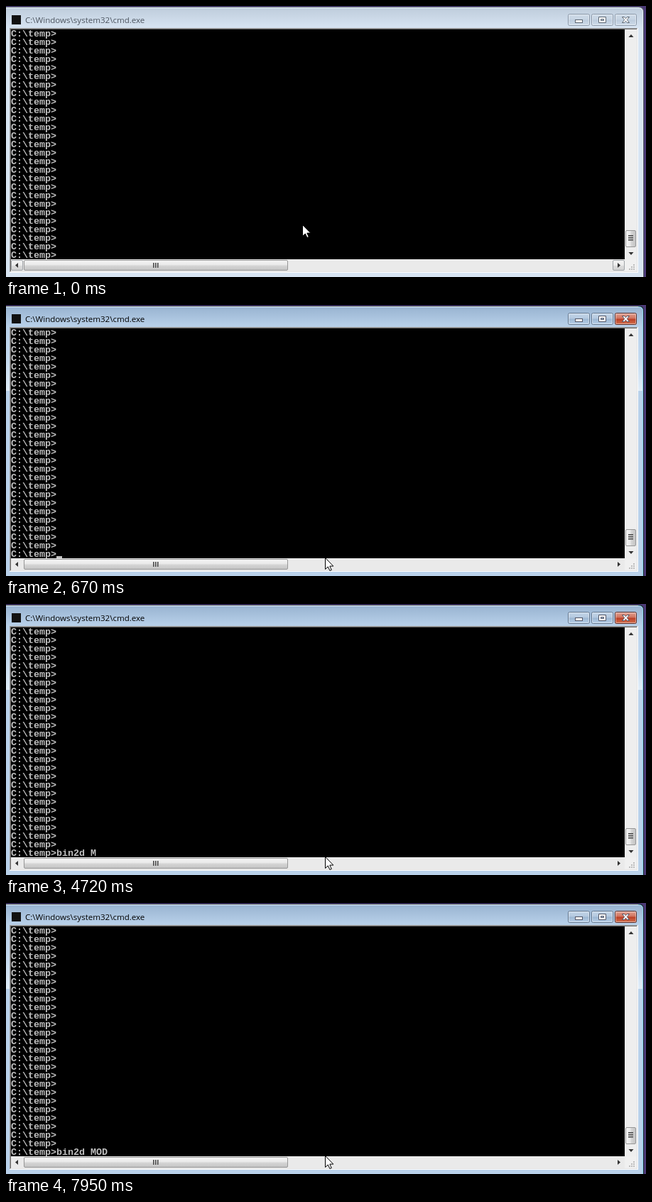
Animation, 901 px wide and 382 px high, one loop 8 s. Source, as an HTML page:

```html
<!DOCTYPE html>
<html lang="en">
<head>
<meta charset="utf-8">
<title>Console</title>
<style>
  html, body { margin: 0; width: 100%; height: 100%; overflow: hidden; background: #4b3a77; }
  svg { display: block; width: 100vw; height: 100vh; }
  .title { font: 11.55px "Open Sans", "Noto Sans", sans-serif; }
  .console { font: bold 13.33px "Liberation Mono", "Courier New", monospace; fill: #c0c0c0; white-space: pre; }
</style>
</head>
<body>
<svg id="stage" viewBox="0 0 901 382" preserveAspectRatio="none">
  <defs>
    <clipPath id="screen"><rect x="7" y="33" width="864" height="324"/></clipPath>
  </defs>
</svg>
<script>
const stage = document.getElementById('stage');
const defs = stage.querySelector('defs');
const LOOP = 8000, CELL = 8, ROW = 12, LEFT = 7, PROMPT = 'C:\\temp>';

function add(parent, tag, attrs, text) {
  const el = document.createElementNS('http://www.w3.org/2000/svg', tag);
  for (const key in attrs) el.setAttribute(key, attrs[key]);
  if (text !== undefined) el.textContent = text;
  parent.appendChild(el);
  return el;
}
const rect = (parent, x, y, width, height, fill, more) =>
  add(parent, 'rect', { x, y, width, height, fill, ...more });
const path = (parent, d, fill, more) => add(parent, 'path', { d, fill, ...more });

// stops: [offset, colour] pairs; runs downwards unless across is set
function gradient(id, stops, across) {
  const g = add(defs, 'linearGradient', { id, x1: 0, y1: 0, x2: across ? 1 : 0, y2: across ? 0 : 1 });
  for (const [offset, color] of stops) add(g, 'stop', { offset, 'stop-color': color });
  return `url(#${id})`;
}

const thumbStops = [[0, '#f6f6f6'], [.48, '#e8e8e8'], [.52, '#d6d6d6'], [1, '#c4c4c4']];
const thumbDown = gradient('thumbDown', thumbStops);
const thumbAcross = gradient('thumbAcross', thumbStops, true);
const arrowFace = gradient('arrowFace', [[0, '#f5f5f5'], [.5, '#ebebeb'], [.52, '#dcdcdc'], [1, '#d2d2d2']]);

const idleButton = [[0, '#cfdbe8'], [.48, '#c6d4e3'], [.52, '#bccbdc'], [1, '#cfdcea']];
const looks = {
  idle: {
    title: [[0, '#bfcddc'], [1, '#d7e4f2']],
    side: [[0, '#d7e4f2'], [1, '#d7e4f2']],
    frame: '#d7e4f2', edge: '#56606c', glow: '#e9f1f9', text: '#4d5560', glyphEdge: '#5c6672',
    button: idleButton, close: idleButton, rim: '#8997a8', closeRim: '#8997a8'
  },
  active: {
    title: [[0, '#99b4d1'], [1, '#b9d1ea']],
    side: [[0, '#b9d1ea'], [.5, '#c3d9ef'], [1, '#e1edf8']],
    frame: '#b9d1ea', edge: '#20262e', glow: '#8fdcf2', text: '#000', glyphEdge: '#535666',
    button: [[0, '#c5d6e8'], [.48, '#b3c8df'], [.52, '#9cb6d2'], [1, '#b8d0e8']],
    close: [[0, '#e3a596'], [.48, '#d0705b'], [.52, '#bb3e25'], [1, '#d3714f']],
    rim: '#62778f', closeRim: '#5a2a26'
  }
};

function drawButton(g, x, face, rim) {
  rect(g, x + .5, 11.5, 30, 16, face, { rx: 2, stroke: rim });
  rect(g, x + 1.5, 12.5, 28, 14, 'none', { rx: 1, stroke: '#fff', 'stroke-opacity': .45 });
}

function drawFrame(name) {
  const look = looks[name];
  const g = add(stage, 'g', {});
  path(g, 'M0 1H891Q898 1 898 8V382H0Z', look.edge);
  path(g, 'M0 2H890.5Q897 2 897 8.5V382H0Z', look.glow);
  rect(g, 0, 2, 890, 1, '#e9f2fb');
  path(g, 'M0 3H890Q896 3 896 9V382H0Z', look.frame);
  path(g, 'M0 3H890Q896 3 896 9V31H0Z', gradient(name + 'Title', look.title));
  const side = gradient(name + 'Side', look.side);
  rect(g, 0, 31, 5, 90, side);
  rect(g, 890, 31, 6, 90, side);

  rect(g, 8, 13, 13, 13, '#111');
  add(g, 'text', { x: 27, y: 24, class: 'title', fill: look.text }, 'C:\\Windows\\system32\\cmd.exe');

  const face = gradient(name + 'Button', look.button);
  drawButton(g, 791, face, look.rim);
  drawButton(g, 824, face, look.rim);
  drawButton(g, 857, gradient(name + 'Close', look.close), look.closeRim);
  const ink = { stroke: look.glyphEdge, 'stroke-width': 1 };
  rect(g, 801.5, 19.5, 10, 4, '#fff', ink);
  path(g, 'M834.5 15.5H844.5V23.5H834.5ZM837.5 18.5V20.5H841.5V18.5Z', '#fff', { ...ink, 'fill-rule': 'evenodd' });
  path(g, 'M867.5 15.5H870.5L872.5 17.7L874.5 15.5H877.5L874.3 19.5L877.5 23.5H874.5L872.5 21.3L870.5 23.5H867.5L870.7 19.5Z', '#fff', ink);
  return g;
}

function drawBody() {
  const g = add(stage, 'g', {});
  // sunken edge, two pixels deep
  rect(g, 5, 31, 885, 345, '#fff');
  rect(g, 5, 31, 884, 344, '#a0a0a0');
  rect(g, 6, 32, 883, 343, '#e3e3e3');
  rect(g, 6, 32, 882, 342, '#696969');
  rect(g, 7, 33, 881, 341, '#f0f0f0');
  rect(g, 7, 33, 864, 324, '#000');
  rect(g, 871, 33, 17, 324, '#eeeeee');
  rect(g, 7, 357, 864, 17, '#eaeaea');

  rect(g, 872.5, 316.5, 14, 23, thumbAcross, { rx: 1.5, stroke: '#979797' });
  rect(g, 25.5, 358.5, 371, 14, thumbDown, { rx: 1.5, stroke: '#979797' });
  for (let i = 0; i < 3; i++) {
    rect(g, 876, 323 + 3 * i, 7, 1, '#4a4a4a');
    rect(g, 876, 324 + 3 * i, 7, 1, '#8c8c8c');
    rect(g, 207 + 3 * i, 362, 1, 7, '#4a4a4a');
    rect(g, 208 + 3 * i, 362, 1, 7, '#8c8c8c');
  }
  // resize grip
  for (let r = 0; r < 3; r++)
    for (let c = 2 - r; c < 3; c++)
      rect(g, 877 + 3 * c, 364 + 3 * r, 2, 2, '#bcbcbc');
}

function drawArrows() {
  const g = add(stage, 'g', {});
  path(g, 'M876.5 44H883.5L880 40Z', '#333');
  path(g, 'M876.5 347H883.5L880 351Z', '#333');
  path(g, 'M17 362V369L13 365.5Z', '#333');
  path(g, 'M861 362V369L865 365.5Z', '#333');
}

const frames = { idle: drawFrame('idle'), active: drawFrame('active') };
drawBody();
const arrowBoxes = add(stage, 'g', {});
for (const x of [7, 854])
  rect(arrowBoxes, x + .5, 358.5, 16, 14, arrowFace, { rx: 1.5, stroke: '#a0a4a8' });
drawArrows();

const screen = add(stage, 'g', { 'clip-path': 'url(#screen)' });
const lines = [];
for (let row = 0; row < 27; row++)
  lines.push(add(screen, 'text', { x: LEFT, y: 43 + ROW * row, class: 'console' }, PROMPT));
const input = lines[26];
const caret = rect(screen, LEFT, 354, CELL, 3, '#c0c0c0');

const pointer = path(stage, 'M.5 .5V16.5L4.3 13L6.9 18.5L9.3 17.5L6.8 12.1H11.8Z', '#fff',
  { stroke: '#000', 'stroke-linejoin': 'round' });

// [time, key]; '<' is backspace
const keys = [
  [1800, 'b'], [1880, 'i'], [1960, 'n'], [3070, '2'], [3330, 'd'], [3820, ' '],
  [4720, 'M'], [4840, 'O'], [4940, 'D'], [5040, 'L'], [5140, 'U'], [5290, 'E'], [5320, '.'],
  [5840, '<'], [5980, '<'], [6130, '<'], [6990, '<']
];
// A key press hides the caret until the next blink tick.
const caretOn = [
  [670, 1200], [1720, 1800], [2240, 2770], [3280, 3330], [3800, 3820], [4320, 4720],
  [5350, 5840], [5860, 5980], [6370, 6900], [7420, 7950]
];
const moves = [
  [0, 417, 308], [30, 418, 309], [70, 420, 310], [110, 421, 310], [260, 424, 317],
  [300, 430, 328], [350, 438, 341], [390, 445, 352], [430, 449, 356]
];

const show = (el, on) => el.setAttribute('visibility', on ? 'visible' : 'hidden');

function render(t) {
  const active = t >= 170;
  show(frames.idle, !active);
  show(frames.active, active);
  show(arrowBoxes, !active);

  let typed = '';
  for (const [at, key] of keys)
    if (t >= at) typed = key === '<' ? typed.slice(0, -1) : typed + key;
  const line = PROMPT + typed;
  if (input.textContent !== line) input.textContent = line;

  caret.setAttribute('x', LEFT + CELL * line.length);
  show(caret, caretOn.some(([from, to]) => t >= from && t < to));

  const [, x, y] = moves.filter(m => t >= m[0]).pop();
  pointer.setAttribute('transform', `translate(${x} ${y})`);
}

const start = performance.now();
function tick() {
  render((performance.now() - start) % LOOP);
  requestAnimationFrame(tick);
}
tick();
</script>
</body>
</html>
```
